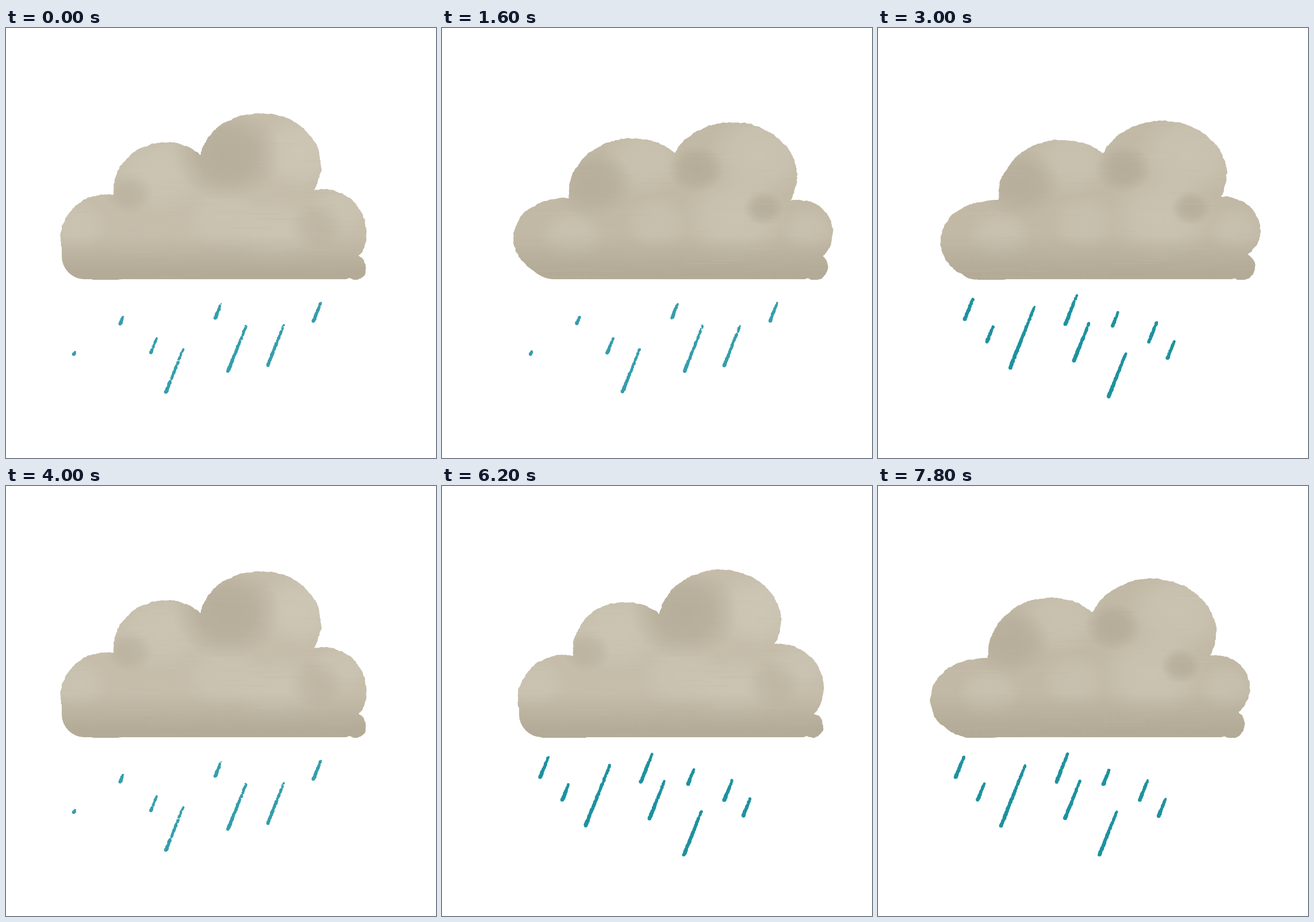
Animation of 748x748 px, one loop 8.01 s. Source, as an HTML page with a canvas:

```html
<!DOCTYPE html>
<html>
<head>
<meta charset="utf-8">
<title>Rain cloud</title>
<style>
html, body { margin: 0; width: 100%; height: 100%; overflow: hidden; background: #fff; }
canvas { display: block; width: 748px; height: 748px; }
</style>
</head>
<body>
<canvas id="c" width="748" height="748"></canvas>
<script>
const ctx = document.getElementById('c').getContext('2d');
const LOOP = 8010, STEP = 200, LAST = 39, CYCLE = 20, FLOOR = 438;
const LIGHT = '206,199,182', DARK = '178,170,150';

// Two cloud paintings. Lobes: x, y, rx, ry. Patches: x, y, radius, shade (+ light, - dark).
const clouds = [
  { base: '#c5bdaa', left: 97, corner: 40,
    lobes: [[175,365,80,76], [277,285,91,86], [442,238,106,90], [548,355,79,75], [608,417,18,21]],
    patches: [[268,255,85,.7], [125,345,55,.6], [510,215,80,.9], [380,330,75,.6], [470,360,80,.7],
              [585,315,55,.6], [385,220,95,-.8], [215,288,42,-.5], [540,345,50,-.35]] },
  { base: '#c1b9a5', left: 106, corner: 57,
    lobes: [[176,366,86,70], [296,290,110,98], [471,258,112,94], [585,356,61,57], [613,415,24,24]],
    patches: [[318,232,75,.6], [520,220,95,.7], [340,340,60,.5], [192,362,58,.6], [475,330,95,.7],
              [602,350,50,.5], [228,270,72,-.7], [408,245,50,-.8], [526,313,36,-.8]] }
];

// Two showers. Drops: middle x, middle y, height.
const rains = [
  { ink: '#359eac', dry: .3, width: 6,
    drops: [[201,508,13], [119,565,5], [257,552,26], [369,492,25], [293,596,74],
            [402,557,80], [469,552,70], [541,494,32]] },
  { ink: '#1f929f', dry: .12, width: 6.5,
    drops: [[142,489,35], [179,532,28], [235,538,106], [320,490,50], [338,546,65],
            [397,506,25], [462,529,34], [494,559,30], [400,604,75]] }
];

function random(seed) {
  let s = (seed * 2654435761) >>> 0;
  return () => {
    s = (s + 0x6D2B79F5) >>> 0;
    let v = Math.imul(s ^ s >>> 15, 1 | s);
    v ^= v + Math.imul(v ^ v >>> 7, 61 | v);
    return ((v ^ v >>> 14) >>> 0) / 4294967296;
  };
}

const sway = f => 19 * (1 - Math.cos(2 * Math.PI * f / CYCLE));

function roughLobe([x, y, rx, ry], rnd) {
  const n = Math.ceil((rx + ry) * 1.6);
  let rough = 0;
  for (let i = 0; i < n; i++) {
    const a = i / n * 2 * Math.PI;
    rough = rough * .7 + (rnd() - .5) * 1.5;
    const px = x + (rx + rough) * Math.cos(a), py = y + (ry + rough) * Math.sin(a);
    ctx[i ? 'lineTo' : 'moveTo'](px, Math.min(py, FLOOR));
  }
  ctx.closePath();
}

function outline(cloud, f) {
  const rnd = random(f + 1), lean = f < CYCLE / 2 ? 0 : 5;
  const knob = cloud.lobes[4];
  ctx.beginPath();
  cloud.lobes.forEach(([x, y, rx, ry], i) => {
    // the upper lobes tip over on the way back
    const turn = Math.PI * i / 3, tip = i < 4 ? lean : 0;
    roughLobe([x + tip * Math.sin(turn), y + tip * Math.cos(turn), rx, ry], rnd);
  });
  ctx.roundRect(cloud.left, 299, knob[0] - cloud.left, FLOOR - 300, [80, 80, 20, cloud.corner]);
}

function patch([x, y, r, shade]) {
  const tone = shade > 0 ? LIGHT : DARK, g = ctx.createRadialGradient(0, 0, 0, 0, 0, r);
  g.addColorStop(0, `rgba(${tone},${Math.abs(shade)})`);
  g.addColorStop(.5, `rgba(${tone},${Math.abs(shade) * .8})`);
  g.addColorStop(1, `rgba(${tone},0)`);
  ctx.save();
  ctx.translate(x, y);
  ctx.scale(1, .85);
  ctx.fillStyle = g;
  ctx.fillRect(-r, -r, 2 * r, 2 * r);
  ctx.restore();
}

function drawCloud(f) {
  const kind = Math.floor(f / 5) % 2, cloud = clouds[kind];
  ctx.save();
  ctx.translate(sway(f), 0);
  outline(cloud, f);
  ctx.clip();
  ctx.fillStyle = cloud.base;
  ctx.fillRect(0, 0, 748, 460);
  cloud.patches.forEach(patch);

  const low = ctx.createLinearGradient(0, 360, 0, 425);
  low.addColorStop(0, `rgba(${DARK},0)`);
  low.addColorStop(1, `rgba(${DARK},.95)`);
  ctx.fillStyle = low;
  ctx.fillRect(0, 360, 748, 100);

  // dry brush streaks
  const rnd = random(70 + kind);
  for (let i = 0; i < 260; i++) {
    const x = 80 + rnd() * 560, y = 150 + rnd() * 290, w = 20 + rnd() * 60;
    ctx.fillStyle = `rgba(${rnd() < .5 ? LIGHT : DARK},${.04 + rnd() * .12})`;
    ctx.fillRect(x - w / 2, y, w, .7 + rnd());
  }
  ctx.restore();
}

// A slanted brush stroke, crumbling towards the top
function drawDrop([x, y, h], { dry, width }, rnd) {
  const n = Math.ceil(h);
  for (let i = 0; i <= n; i++) {
    const t = i / n - .5, worn = rnd() < dry * (1.1 - 1.6 * t);
    const r = worn ? .5 + rnd() : width / 2 * (.82 + .25 * t) + (rnd() - .5);
    const spread = worn ? width * .6 : 1.2;
    ctx.beginPath();
    ctx.arc(x - .4 * h * t + (rnd() - .5) * spread, y + h * t, r, 0, 7);
    ctx.fill();
  }
}

function drawRain(f) {
  const rain = rains[Math.floor(f / 2) % 2], rnd = random(200 + f);
  ctx.save();
  ctx.translate(sway(f + .5), 0);
  ctx.fillStyle = rain.ink;
  rain.drops.forEach(drop => drawDrop(drop, rain, rnd));
  ctx.restore();
}

function draw(f) {
  ctx.fillStyle = '#fff';
  ctx.fillRect(0, 0, 748, 748);
  drawCloud(f);
  drawRain(f);
}

const start = performance.now();
let shown = -1;
function tick() {
  const t = (performance.now() - start) % LOOP;
  const f = Math.min(LAST, Math.floor(t / STEP)) % CYCLE;
  if (f !== shown) draw(shown = f);
  requestAnimationFrame(tick);
}
tick();
</script>
</body>
</html>
```
